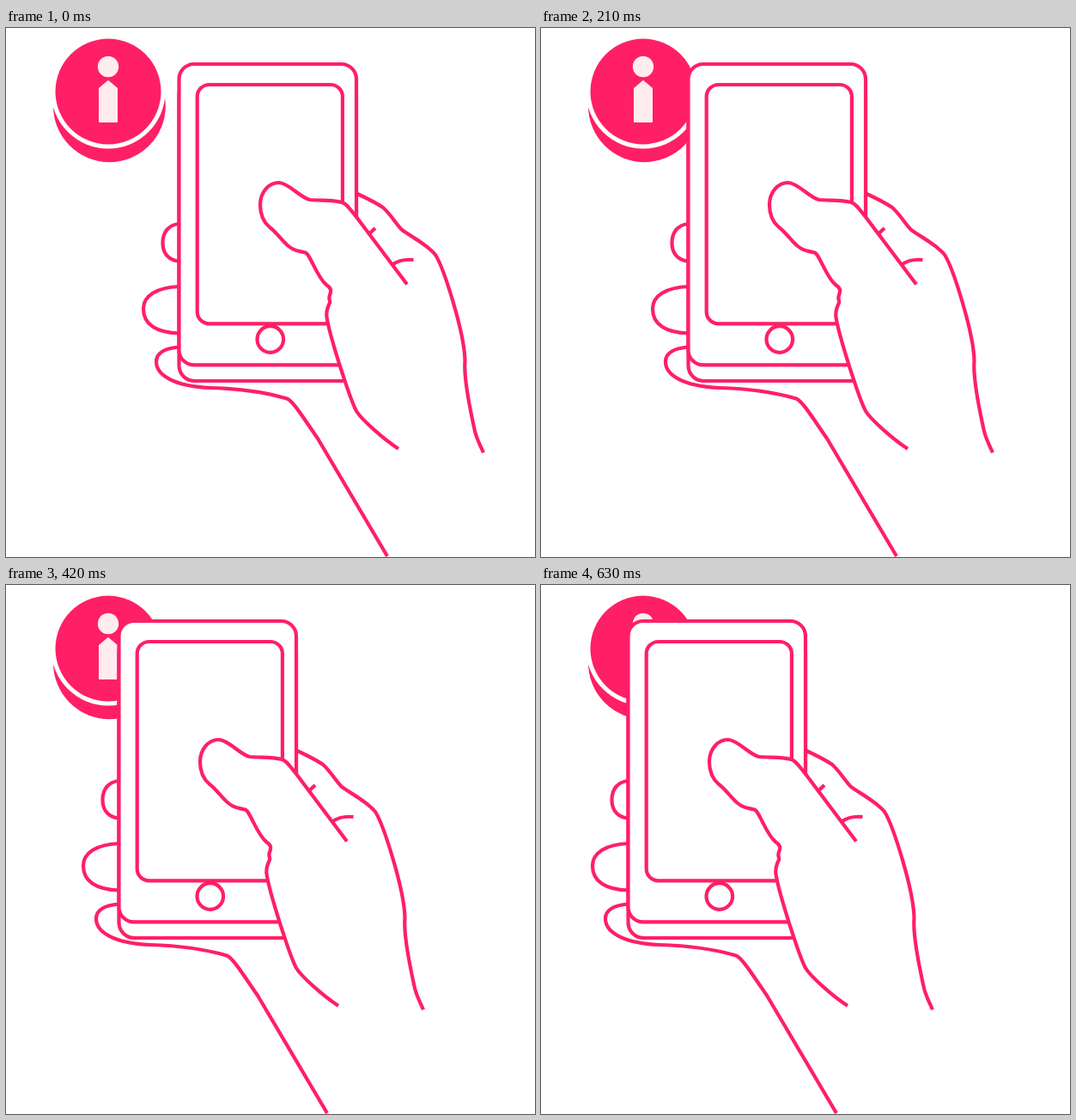
These frames come from a looping animation (616 px wide and 616 px high, 1030 ms). An HTML page:

```html
<!DOCTYPE html>
<html lang="en">
<head>
<meta charset="utf-8">
<title>Phone approaching an info tag</title>
<style>
  html, body { margin: 0; width: 100%; height: 100%; overflow: hidden; background: #fff; }
  svg { display: block; width: 100%; height: 100%; }
  .tag { fill: #ff1f66; }
  .letter { fill: #ffecf1; stroke: #ffecf1; stroke-width: 2; stroke-linejoin: round; }
  #phone { fill: #fff; stroke: #ff1f66; stroke-width: 4.2; stroke-linejoin: round; }
  .line { fill: none; }
</style>
</head>
<body>
<svg viewBox="0 0 616 616">
  <g class="tag">
    <circle cx="120.4" cy="90.8" r="65.4"/>
    <circle cx="119" cy="74" r="66.5" fill="#fff"/>
    <circle cx="119" cy="74" r="61.5"/>
    <g class="letter">
      <circle cx="119" cy="45" r="11.2"/>
      <path d="M109 70.5L119 62L129 70.5V109H109Z"/>
    </g>
  </g>

  <g id="phone">
    <!-- fingers and wrist -->
    <path class="line" d="M202 228C190 229 182.5 237 182.5 250S190 271 202 271.5
      M202 301C175 302 160 312 160 327C160 345 175 355 202 355.5
      M202 371.5C184 373 175 379 175 388.5C175 404 195 417 238 419
      C272 420 305 425 327 431.5C334 434 345 452 363 478L444 615"/>
    <!-- back of the hand -->
    <path class="line" d="M409 193C424 200 430 203 439 209C448 217 454 228 461 235
      C475 245 490 252 500 264C510 280 534 355 534.5 388
      C533 405 538 433 545 465C547 477 551 483 556 494.5"/>
    <!-- phone -->
    <rect x="201.5" y="60" width="206.5" height="351" rx="18"/>
    <rect x="201.5" y="42" width="206.5" height="350.4" rx="17.5"/>
    <rect x="222.7" y="66" width="169.2" height="278.4" rx="14"/>
    <circle cx="307.8" cy="362.5" r="15.3"/>
    <!-- thumb and palm -->
    <path d="M467 298.5L408 220C400 210 396 204 391 203C380 200 368 201 354 200
      C343 198 330 181 318 180C306 180 296 191 296 206C296 216 300 226 307 232
      C318 240 326 256 338 259C342 260 345 261 348.5 261.5C354 263 362 290 373 299
      C379 303 379 306 377 311C375 316 378 317 377 320C375 324 373 328 373.3 335
      C375 350 383 375 390 397C396 415 402 435 408 446C414 456 440 479 457 490"/>
    <path class="line" d="M421.5 241L430 233M450 275.5Q460 268.500 474.500 270"/>
  </g>
</svg>
<script>
  const LOOP = 1030, STEP = 70, LAST_STEP = 9;
  const phone = document.getElementById("phone");

  function draw(now) {
    const step = Math.min(LAST_STEP, Math.floor((now % LOOP) / STEP));
    // 10 px per step, with one double-length step at the fourth.
    const shift = 10 * (step + (step >= 4 ? 1 : 0));
    phone.setAttribute("transform", `translate(${-shift} 0)`);
  }

  const start = performance.now();
  function tick() {
    draw(performance.now() - start);
    requestAnimationFrame(tick);
  }
  tick();
</script>
</body>
</html>
```
